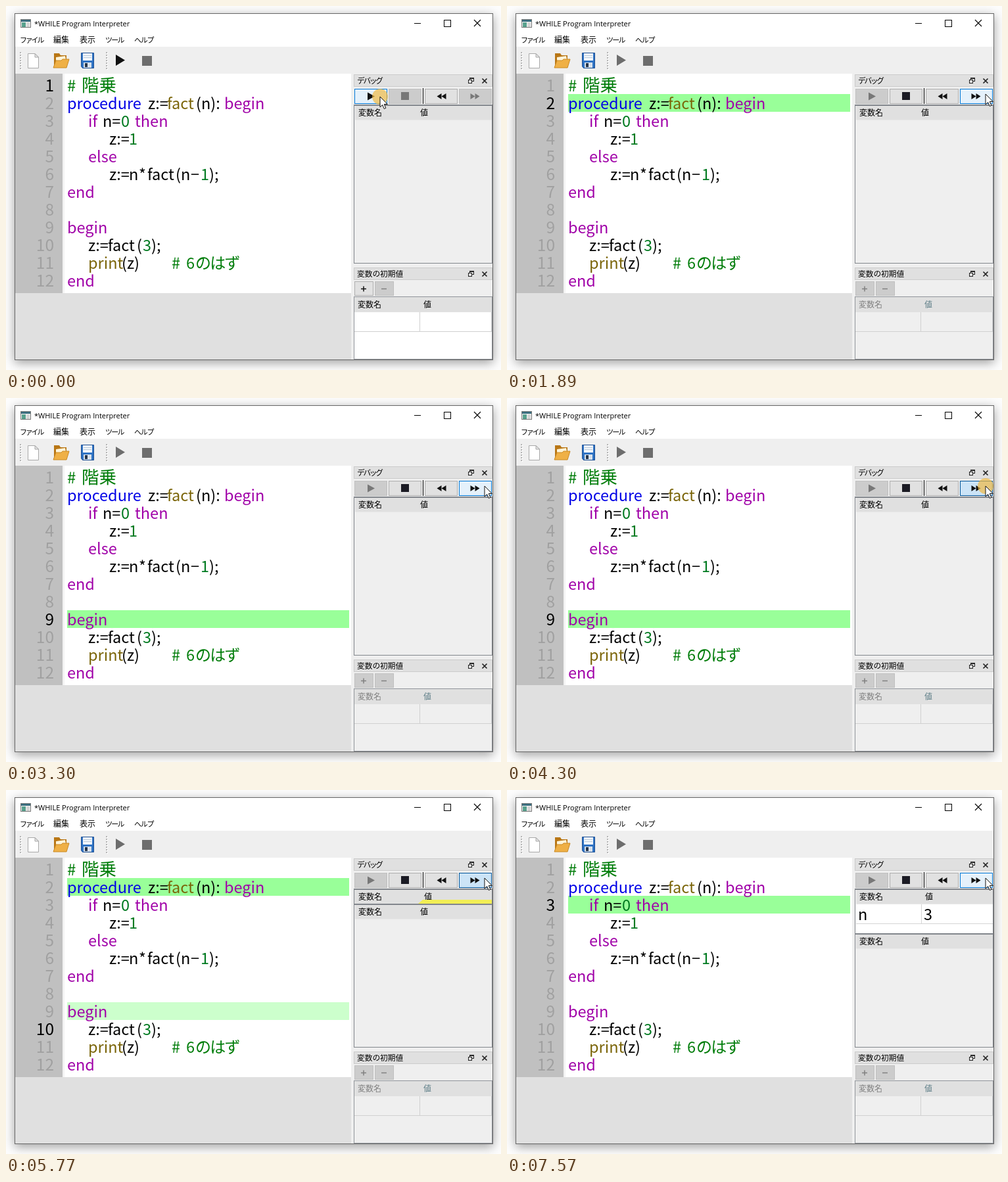
Animation of 753x554 px, one loop 8 s. Source, as an HTML page with a canvas:

```html
<!DOCTYPE html>
<html lang="ja">
<head>
<meta charset="utf-8">
<title>WHILE Program Interpreter</title>
<style>
html, body { margin: 0; width: 100%; height: 100%; overflow: hidden; background: #fdfdfd; }
canvas { display: block; }
</style>
</head>
<body>
<canvas id="stage" width="753" height="554"></canvas>
<script>
const ctx = document.getElementById('stage').getContext('2d');
const LOOP = 8000;
const CJK = '"Noto Sans CJK JP", "Noto Sans CJK", sans-serif';
const UI = '"Open Sans", sans-serif';
const KEY = '#a000a8', FUNC = '#7a6408', NUM = '#007a20', NOTE = '#007d0a', BLACK = '#000';

// Each token: line, x, text, colour
const CODE = [
  [2, 93, 'procedure', '#0000e6'], [2, 216, 'z:=', BLACK], [2, 245, 'fact', FUNC],
  [2, 289, '(n):', BLACK], [2, 332, 'begin', KEY],
  [3, 125, 'if', KEY], [3, 147, 'n=', BLACK], [3, 175, '0', NUM], [3, 196, 'then', KEY],
  [4, 157, 'z:=', BLACK], [4, 187, '1', NUM],
  [5, 125, 'else', KEY],
  [6, 157, 'z:=', BLACK], [6, 187, 'n', BLACK], [6, 202, '*', BLACK], [6, 215, 'fact', BLACK],
  [6, 258, '(n', BLACK], [6, 281, '−', BLACK], [6, 296, '1', NUM], [6, 309, ');', BLACK],
  [7, 93, 'end', KEY],
  [9, 93, 'begin', KEY],
  [10, 125, 'z:=', BLACK], [10, 155, 'fact', BLACK], [10, 199, '(', BLACK],
  [10, 208, '3', NUM], [10, 221, ');', BLACK],
  [11, 125, 'print', FUNC], [11, 176, '(z)', BLACK], [11, 252, '#', NOTE], [11, 274, '6', NOTE],
  [12, 93, 'end', KEY]
];

const clamp = v => Math.max(0, Math.min(1, v));
const ramp = (t, a, b) => clamp((t - a) / (b - a));
const ease = p => p * p * (3 - 2 * p);

function mix(a, b, p) {
  const ch = (c, i) => parseInt(c.slice(i, i + 2), 16);
  return 'rgb(' + [1, 3, 5].map(i => Math.round(ch(a, i) + (ch(b, i) - ch(a, i)) * p)) + ')';
}

function box(x, y, w, h, fill) {
  ctx.fillStyle = fill;
  ctx.fillRect(x, y, w, h);
}

function frame(x, y, w, h, fill, line) {
  box(x, y, w, h, line);
  box(x + 1, y + 1, w - 2, h - 2, fill);
}

function poly(points, fill, line) {
  ctx.beginPath();
  points.forEach(([x, y]) => ctx.lineTo(x, y));
  ctx.closePath();
  if (fill) { ctx.fillStyle = fill; ctx.fill(); }
  if (line) { ctx.strokeStyle = line; ctx.lineWidth = 1; ctx.stroke(); }
}

function lines(segments, color, width) {
  ctx.strokeStyle = color;
  ctx.lineWidth = width;
  ctx.beginPath();
  segments.forEach(([x1, y1, x2, y2]) => { ctx.moveTo(x1, y1); ctx.lineTo(x2, y2); });
  ctx.stroke();
}

function text(s, x, y, size, color = BLACK, spacing = 0, family = CJK, align = 'left') {
  ctx.font = size + 'px ' + family;
  ctx.letterSpacing = spacing + 'px';
  ctx.textAlign = align;
  ctx.fillStyle = color;
  ctx.fillText(s, x, y);
}

// Everything that depends on time
function stateAt(t) {
  const running = t >= 130;
  let line = 1, mark = 0;
  const moves = [[130, 2], [2950, 9], [4430, 10], [5770, 2], [7230, 3]];
  for (const [at, n] of moves) {
    if (t >= at) mark = n;
    if (t >= at + 60) line = n;
  }
  const p = ease(ramp(t, 940, 1680));
  const cursor = { x: 569 + 159 * p, y: 138 - 4 * p - 28 * Math.sin(Math.PI * p) };
  return { running, line, mark, cursor };
}

function drawWindow() {
  box(0, 0, 753, 554, '#fdfdfd');
  ctx.save();
  ctx.shadowColor = 'rgba(0,0,0,.38)';
  ctx.shadowBlur = 15;
  ctx.shadowOffsetY = 4;
  box(13, 11, 728, 528, '#666');
  ctx.restore();
  box(14, 12, 726, 526, '#efefef');
  box(14, 12, 726, 50, '#fff');

  frame(22, 20, 16, 13, '#f4f4f4', '#777');
  box(23, 21, 14, 3, '#3c6f80');
  box(24, 25, 6, 7, '#57a08c');
  box(31, 25, 5, 7, '#d5d5d5');
  text('*WHILE Program Interpreter', 43, 31, 11, BLACK, 0, UI);
  box(621, 26, 10, 1, BLACK);
  frame(666, 21, 11, 11, '#fff', BLACK);
  lines([[712, 21, 722, 31], [722, 21, 712, 31]], BLACK, 1.1);

  text('ファイル', 21, 56, 11, BLACK, -2.2);
  text('編集', 72, 56, 12);
  text('表示', 112, 56, 12);
  text('ツール', 151, 56, 11, BLACK, -1.8);
  text('ヘルプ', 195, 56, 11, BLACK, -1.3);
}

function drawToolbar(running) {
  for (const x of [21, 152]) {
    for (let y = 70; y < 97; y += 4) {
      box(x + 1, y + 1, 2, 2, '#fff');
      box(x, y, 2, 2, '#b4b4b4');
    }
  }
  poly([[33.5, 72.5], [44, 72.5], [49.5, 78], [49.5, 94.5], [33.5, 94.5]], '#fff', '#a8a8a8');
  poly([[44, 72.5], [44, 78], [49.5, 78]], '#e4e4e4', '#a8a8a8');

  poly([[73, 72], [81, 72], [83, 75], [92, 75], [92, 94], [73, 94]], '#b97716');
  poly([[76, 78], [90, 76], [92, 86], [76, 88]], '#fff4d8');
  poly([[72, 94], [76, 83], [84, 83], [86, 81], [96, 81], [92, 94]], '#efb046', '#c98922');

  poly([[114.5, 71.5], [133.5, 71.5], [133.5, 94.5], [116.5, 94.5], [114.5, 92]], '#2f73c4', '#1d4f93');
  box(117, 72, 14, 11, '#f4f8fc');
  box(118, 75, 12, 1, '#b8c8d8');
  box(118, 78, 12, 1, '#b8c8d8');
  box(118, 86, 12, 8, '#d9e2ec');
  box(120, 87, 4, 6, '#25364c');

  poly([[167, 74], [181, 82.5], [167, 91]], running ? '#6d6d6d' : '#111');
  box(207, 76, 15, 15, '#6d6d6d');
}

function drawEditor(s, t) {
  box(14, 437, 511, 101, '#e0e0e0');
  box(86, 103, 439, 334, '#fff');
  box(14, 103, 72, 334, '#c0c0c0');
  box(86, 103, 3, 334, '#f3f3f3');
  if (s.mark) box(93, 80 + 27 * s.mark, 429, 27, '#99ff99');
  if (t >= 5770 && t < 5830) box(93, 323, 429, 27, '#ccffcc');
  for (let n = 1; n <= 12; n++) {
    text(n, 73, 103 + 27 * n, 24.5, n === s.line ? BLACK : '#a0a0a0', 0, CJK, 'right');
  }
  text('#', 93, 130, 24, NOTE);
  text('階乗', 115, 130, 26.5, NOTE);
  for (const [n, x, word, color] of CODE) text(word, x, 103 + 27 * n, 23.5, color);
  text('のはず', 288, 400, 24, NOTE, -1.7);
}

function drawDockTitle(title, y, spacing) {
  frame(529, y, 211, 19, '#e0e0e0', '#cbcbcb');
  text(title, 534, y + 14, 11.7, BLACK, spacing);
  frame(705, y + 5, 7, 6, '#e0e0e0', '#222');
  box(705, y + 5, 7, 2, '#222');
  frame(703, y + 8, 6, 6, '#e0e0e0', '#222');
  lines([[724.5, y + 6.5, 731.5, y + 13.5], [731.5, y + 6.5, 724.5, y + 13.5]], '#222', 1.7);
}

const LOOK = {
  off: ['#cccccc', '#bfbfbf'],
  on: ['#e1e1e1', '#adadad'],
  hover: ['#e5f1fb', '#0078d7'],
  down: ['#cce4f7', '#005499']
};

function button(x, y, w, h, from, to = from, p = 1) {
  const [a, b] = [LOOK[from], LOOK[to]];
  frame(x, y, w, h, mix(a[0], b[0], p), mix(a[1], b[1], p));
}

function arrows(x, dir, color) {
  for (const k of [0, 7]) {
    const tip = x + dir * (k - 7), base = tip + dir * 7;
    poly([[base, 137.5], [tip, 133], [tip, 142]], color);
  }
}

// Button look of the step button: hover, pressed, then back
function stepLook(t) {
  if (t < 1750) return ['on', 'on', 1];
  if (t < 1890) return ['on', 'hover', ramp(t, 1700, 1860)];
  for (const c of [2750, 4230, 5570, 7030]) {
    if (t >= c && t < c + 200) return ['hover', 'down', ramp(t, c, c + 60)];
    if (t >= c + 200 && t < c + 500) return ['down', 'hover', ramp(t, c + 200, c + 460)];
  }
  return ['hover', 'hover', 1];
}

function drawDebugButtons(s, t) {
  const { running, cursor } = s;
  const over = x => cursor.x >= x && cursor.x < x + 50 && cursor.y >= 126;
  const grey = '#787878', dark = '#111';
  if (running) button(530, 126, 50, 23, 'hover', 'off', ramp(t, 130, 400));
  else button(530, 126, 50, 23, 'hover');
  poly([[550, 131.5], [561, 137.5], [550, 143.5]], running ? grey : dark);

  button(582, 126, 50, 23, !running ? 'off' : over(582) ? 'hover' : 'on');
  box(601, 131, 12, 12, running ? '#1b1b24' : grey);
  box(634, 125, 1, 24, BLACK);

  button(637, 126, 50, 23, over(637) ? 'hover' : 'on');
  arrows(662.5, -1, dark);

  if (running) button(689, 126, 50, 23, ...stepLook(t));
  else button(689, 126, 50, 23, 'off');
  arrows(713.5, 1, running ? dark : grey);
}

function header(y, valueX) {
  box(531, y, 208, 22, '#e0e0e0');
  box(531, y + 21, 208, 1, '#e8e8e8');
  text('変数名', 536, y + 15, 12);
  text('値', valueX, y + 15, 12);
}

function tableEdge(y, h, fill) {
  frame(529, y, 211, h, fill, '#82868c');
  box(529, y, 211, 2, '#82868c');
}

function drawVariables(t) {
  let top = 150;
  if (t >= 5830) {
    top = 218;
    tableEdge(150, 69, '#fff');
    header(152, 636);
    box(630, 174, 109, 29, t < 7230 ? '#ffff99' : '#fff');
    box(630, 174, 1, 30, '#d4d4d4');
    box(531, 203, 208, 1, '#d4d4d4');
    text('n', 534, 198, 23.5);
    text('3', 634, 198, 23.5);
  } else if (t >= 5770) {
    top = 173;
    tableEdge(150, 24, '#e0e0e0');
    header(152, 636);
    poly([[627, 173], [634, 167], [739, 167], [739, 173]], '#f2ee55');
  }
  tableEdge(top, 392 - top, '#efefef');
  header(top + 2, 630);
}

function drawInitials(running) {
  const ink = running ? '#808080' : '#111';
  drawDockTitle('変数の初期値', 398, 0);
  button(530, 419, 29, 22, running ? 'off' : 'on');
  button(561, 419, 29, 22, 'off');
  lines([[540, 430.5, 548, 430.5], [544, 426.5, 544, 434.5]], ink, 1.5);
  lines([[571, 430.5, 579, 430.5]], '#808080', 1.5);
  frame(529, 442, 211, 96, running ? '#efefef' : '#fff', '#90949a');
  box(530, 443, 209, 23, '#e0e0e0');
  text('変数名', 535, 459, 12, running ? '#808080' : BLACK);
  text('値', 635, 459, 12, running ? '#5f7f88' : BLACK);
  box(530, 495, 209, 1, '#d0d0d0');
  box(629, 466, 1, 30, '#d0d0d0');
  box(738, 466, 1, 30, '#d0d0d0');
}

function drawCursor({ x, y }, t) {
  let glow = 0;
  for (const c of [-60, 2750, 4230, 5570, 7030]) {
    if (t >= c && t < c + 190) glow = 1 - ramp(t, c + 130, c + 190);
  }
  if (glow) {
    ctx.fillStyle = `rgba(240,184,62,${0.68 * glow})`;
    ctx.beginPath();
    ctx.arc(x, y, 12, 0, 7);
    ctx.fill();
  }
  const shape = [[0, 0], [0, 16], [3.7, 12.5], [6.3, 18.5], [8.8, 17.4], [6.3, 11.5], [11.3, 11.5]];
  poly(shape.map(([dx, dy]) => [x + dx, y + dy]), '#fff', '#111');
}

function draw(t) {
  const s = stateAt(t);
  drawWindow();
  drawToolbar(s.running);
  drawEditor(s, t);
  drawDockTitle('デバッグ', 104, -2.3);
  drawDebugButtons(s, t);
  drawVariables(t);
  drawInitials(s.running);
  drawCursor(s.cursor, t);
}

let start = null;
function tick(now) {
  if (start === null) start = now;
  draw((now - start) % LOOP);
  requestAnimationFrame(tick);
}
draw(0);
requestAnimationFrame(tick);
</script>
</body>
</html>
```
